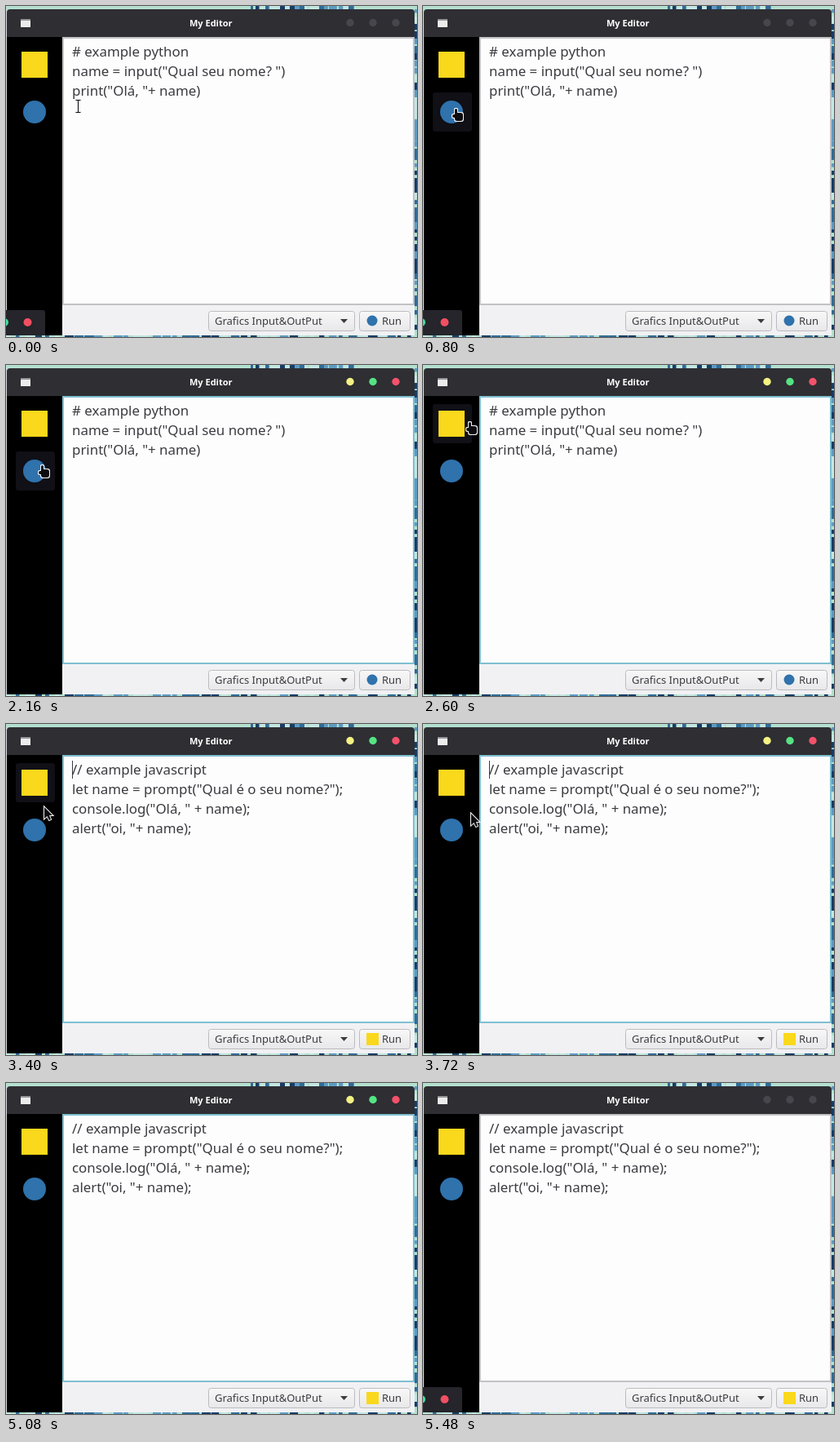
An HTML page with a canvas that plays this animation: 504 by 406 pixels, repeating every 5520 ms.

```html
<!DOCTYPE html>
<html lang="pt">
<head>
<meta charset="utf-8">
<title>My Editor</title>
<style>
html, body { margin: 0; width: 100%; height: 100%; overflow: hidden; background: #b4e0cf; }
canvas { display: block; width: 504px; height: 406px; }
</style>
</head>
<body>
<canvas id="stage" width="504" height="406"></canvas>
<script>
const ctx = document.getElementById('stage').getContext('2d');
const LOOP = 5520;
const SANS = '"Noto Sans", "Open Sans", sans-serif';
const YELLOW = '#fad81c', BLUE = '#2f72ac', INK = '#3b3b40', PALE = '#f4f4f6';

const PYTHON = ['# example python', 'name = input("Qual seu nome? ")', 'print("Olá, "+ name)'];
const SCRIPT = ['// example javascript', 'let name = prompt("Qual é o seu nome?");',
  'console.log("Olá, " + name);', 'alert("oi, "+ name);'];

// Pointer stops, eased in between
const STOPS = [
  { t: 0, x: 88, y: 123 },
  { t: 560, x: 38, y: 126 },
  { t: 1120, x: 43, y: 127 },
  { t: 2080, x: 43, y: 127 },
  { t: 2600, x: 57, y: 70 },
  { t: 3320, x: 47, y: 76 },
  { t: 3400, x: 47, y: 102 },
  { t: 3840, x: 62, y: 112 },
  { t: 4280, x: 247, y: 264 },
  { t: 4480, x: 282, y: 300 }
];

const during = (t, a, b) => t >= a && t < b;
const ease = k => k * k * (3 - 2 * k);

function rect(x, y, w, h, color) {
  ctx.fillStyle = color;
  ctx.fillRect(x, y, w, h);
}

function dot(x, y, r, color) {
  ctx.fillStyle = color;
  ctx.beginPath();
  ctx.arc(x, y, r, 0, Math.PI * 2);
  ctx.fill();
}

function box(x, y, w, h, r, fill, stroke) {
  ctx.beginPath();
  ctx.roundRect(x, y, w, h, r);
  ctx.fillStyle = fill;
  ctx.fill();
  if (!stroke) return;
  ctx.strokeStyle = stroke;
  ctx.lineWidth = 1;
  ctx.stroke();
}

function text(str, x, y, size, color, weight = 400) {
  ctx.font = `${weight} ${size}px ${SANS}`;
  ctx.fillStyle = color;
  ctx.fillText(str, x, y);
}

function desktop() {
  rect(0, 0, 504, 406, '#b4e0cf');
  let seed = 7;
  const rand = () => (seed = seed * 16807 % 2147483647) / 2147483647;
  const tones = ['#173c66', '#5b9cc4', '#c4e6e2', '#2f6c98'];
  const tone = () => tones[Math.floor(rand() * tones.length)];
  for (let x = 300; x < 425; x += 6) rect(x, 0, 3 + rand() * 5, 4, tone());
  for (let y = 4; y < 400; y += 9) rect(501, y, 3, 4 + rand() * 8, tone());
  for (let x = 0; x < 500; x += 12) rect(x, 404, 4 + rand() * 8, 2, tone());
  rect(0, 4, 1, 400, '#d5dade');
}

function titleBar(focused) {
  box(1, 4, 500, 36, [4, 4, 0, 0], '#2e2e33');
  rect(18, 16, 12, 10, '#ececec');
  rect(18, 16, 12, 2, '#98989c');
  text('My Editor', 225, 25, 11, '#fff', 700);
  const lit = ['#f4f283', '#55e383', '#f2526a'];
  lit.forEach((c, i) => dot(422 + 28 * i, 20.5, 4.7, focused ? c : '#46464c'));
}

function sideBar(hover) {
  rect(1, 38, 68, 366, '#000');
  if (hover === 'js') box(12, 48, 48, 48, 3, '#101016');
  if (hover === 'py') box(12, 106, 48, 48, 3, '#101016');
  rect(19, 56, 32, 32, YELLOW);
  dot(35, 130, 14, BLUE);
}

function editor(lines, focused, caret) {
  rect(69, 38, 432, 329, focused ? '#7fbfd0' : '#c2c2c6');
  rect(71, 40, 428, 325, '#fdfdfd');
  lines.forEach((line, i) => text(line, 81, 62 + 24 * i, 16.9, INK));
  if (caret) rect(81, 45, 1, 22, INK);
}

function bottomBar(js) {
  rect(69, 367, 432, 37, '#f1f1f4');
  for (const [x, w] of [[248.5, 179], [433.5, 62]]) {
    const shade = ctx.createLinearGradient(0, 374, 0, 398);
    shade.addColorStop(0, '#f8f8f8');
    shade.addColorStop(1, '#e8e8ea');
    box(x, 374.5, w, 24, 3, shade, '#bcbcc0');
  }
  text('Grafics Input&OutPut', 256, 391, 13, INK);
  ctx.fillStyle = INK;
  ctx.beginPath();
  ctx.moveTo(410, 384);
  ctx.lineTo(419, 384);
  ctx.lineTo(414.5, 389);
  ctx.fill();
  if (js) rect(442, 379, 15, 15, YELLOW);
  else dot(449, 386, 6.5, BLUE);
  text('Run', 461, 391, 13, INK);
}

function recorder() {
  box(-4, 373, 52, 31, [0, 3, 0, 0], '#25252b');
  dot(-2, 388, 5, '#44e0a0');
  dot(26.5, 388, 5, '#f24f62');
}

// Pointers are drawn twice: a pale rim, then the dark body
const pointers = {
  arrow(rim) {
    ctx.lineWidth = 2 * rim;
    ctx.strokeStyle = ctx.fillStyle;
    const shape = new Path2D('M0 0V14L3.5 11 6 16 8 15 6 10H10Z');
    ctx.fill(shape);
    if (rim) ctx.stroke(shape);
  },
  hand(rim) {
    ctx.beginPath();
    ctx.roundRect(-1 - rim, -rim, 3 + 2 * rim, 10 + 2 * rim, 1.5);
    ctx.roundRect(-1 - rim, 5 - rim, 10 + 2 * rim, 10 + 2 * rim, 3);
    ctx.roundRect(-4 - rim, 7 - rim, 6 + 2 * rim, 4 + 2 * rim, 2);
    ctx.fill();
  },
  beam(rim) {
    for (const [y, w, h] of [[-8, 6, 1], [-7, 1, 14], [7, 6, 1]]) {
      ctx.fillRect(0.5 - w / 2 - rim, y - rim, w + 2 * rim, h + 2 * rim);
    }
  }
};

function position(t) {
  const i = STOPS.findIndex(s => s.t > t);
  const a = STOPS[i - 1], b = STOPS[i];
  const k = ease((t - a.t) / (b.t - a.t));
  return [a.x + (b.x - a.x) * k, a.y + (b.y - a.y) * k];
}

function pointer(t) {
  if (t >= 4480) return;
  const [x, y] = position(t);
  const kind = x > 70 ? 'beam' : during(t, 240, 3360) ? 'hand' : 'arrow';
  ctx.save();
  ctx.translate(Math.round(x), Math.round(y));
  for (const rim of [1, 0]) {
    ctx.fillStyle = rim ? PALE : '#0c0c10';
    pointers[kind](rim);
  }
  ctx.restore();
}

function hovered(t) {
  if (during(t, 320, 2240)) return 'py';
  return during(t, 2360, 3560) ? 'js' : '';
}

function draw(t) {
  const focused = during(t, 880, 5440);
  const js = t >= 2680;
  // The caret rests while a sidebar button is in use
  const editing = focused && !during(t, 1480, 3080);
  const caret = editing && (t + 520) % 1200 < 800;
  desktop();
  titleBar(focused);
  sideBar(hovered(t));
  editor(js ? SCRIPT : PYTHON, focused, caret);
  bottomBar(js);
  if (!focused) recorder();
  pointer(t);
}

const start = performance.now();
function tick() {
  const t = (performance.now() - start) % LOOP;
  draw(Math.floor(t / 40) * 40);
  requestAnimationFrame(tick);
}
tick();
</script>
</body>
</html>
```
